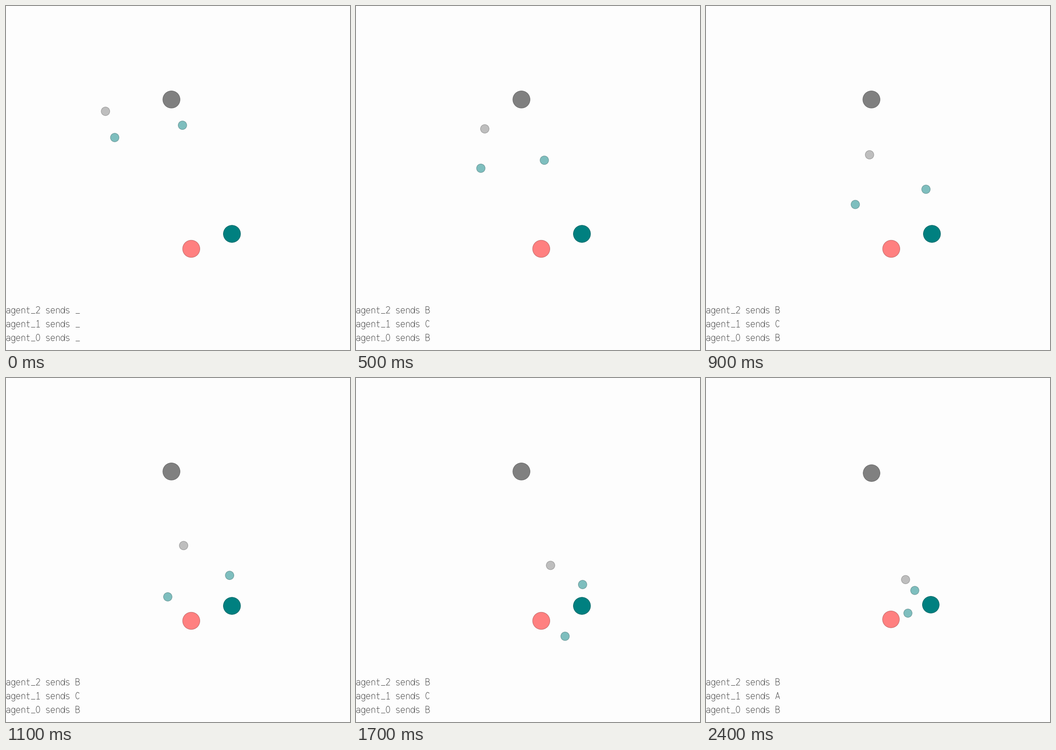
These frames come from a looping animation (748x748 px, 2500 ms). A matplotlib script:

```python
import numpy as np
import matplotlib.pyplot as plt
from matplotlib.animation import FuncAnimation
from matplotlib.collections import LineCollection
from matplotlib.patches import Circle

SIZE, DPI = 748, 100
FRAMES, INTERVAL = 25, 100
CENTER = SIZE / 2
PX = 72 / DPI

# World: each step adds one push along an axis and damps the velocity.
PUSH, KEEP = 9.39, 0.75
VIEW_LIMIT = 189.8
MOVES = {"L": (-1, 0), "R": (1, 0), "U": (0, -1), "D": (0, 1), ".": (0, 0)}

TEAL, GREY, RED = (0, 0.5, 0.5), (0.5, 0.5, 0.5), (1, 0.5, 0.5)
AGENTS = [
    ((236.4, 286.0), "DRDDRDDRRDDRRDRLRLUULRLU", TEAL),
    ((383.7, 259.3), "DDDRRRDDRLDRLURLLRLRLLDR", TEAL),
    ((216.3, 229.0), "RRDDRRDRDDRRLLRLRUD.LRDD", GREY),
]
LANDMARKS = [((359.7, 203.3), GREY), ((402.8, 528.0), RED), ((491.3, 495.5), TEAL)]

ADVANCE = 10.75
ROWS = [("agent_2", 668), ("agent_1", 698), ("agent_0", 728)]


def walk(start, moves):
    pos, vel = np.array(start), np.zeros(2)
    path = [pos]
    for m in moves:
        vel = KEEP * vel + PUSH * np.array(MOVES[m])
        pos = pos + vel
        path.append(pos)
    return np.array(path)


def arc(cx, cy, rx, ry, a0=0, a1=360):
    t = np.radians(np.linspace(a0, a1, 28))
    return list(zip(cx + rx * np.cos(t), cy - ry * np.sin(t)))


# Single-line glyphs; the baseline is y = 0 and y points down.
GLYPHS = {
    " ": [],
    "_": [[(0.6, -0.5), (9.6, -0.5)]],
    "a": [arc(5, -7.4, 3.5, 3, 160, 0) + [(8.5, 0)], arc(4.8, -3, 3.7, 3)],
    "d": [arc(4.8, -5.2, 3.8, 5.2), [(8.6, -14.6), (8.6, 0)]],
    "e": [[(1.2, -5.4)] + arc(5, -5.2, 3.9, 5.2, 0, 320)],
    "g": [arc(4.8, -5.2, 3.8, 5.2), [(8.6, -10.4)] + arc(5, 1.5, 3.6, 3.2, 0, -160)],
    "n": [[(1.6, -10.4), (1.6, 0)], arc(5.2, -6.8, 3.6, 3.6, 180, 0) + [(8.8, 0)]],
    "s": [arc(5, -7.8, 3.3, 2.6, 25, 270) + arc(5, -2.6, 3.5, 2.6, 90, -155)],
    "t": [[(4.2, -14)] + arc(6.4, -2.4, 2.2, 2.4, 180, 310), [(1.4, -10.4), (8, -10.4)]],
    "0": [arc(5, -7.3, 3.9, 7.3)],
    "1": [[(2.4, -12.2), (5.4, -14.6), (5.4, 0)], [(2, 0), (8.8, 0)]],
    "2": [arc(5, -10.8, 3.8, 3.8, 165, -30) + [(1.2, 0), (9.2, 0)]],
    "A": [[(0.8, 0), (5.2, -14.6), (9.6, 0)], [(2.3, -5), (8.1, -5)]],
    "B": [[(1.4, 0), (1.4, -14.6)] + arc(5.4, -11.2, 3.2, 3.4, 90, -90) + [(1.4, -7.8)],
          [(5.4, -7.8)] + arc(5.4, -3.9, 4, 3.9, 90, -90) + [(1.4, 0)]],
    "C": [arc(5.4, -7.3, 4.2, 7.3, 40, 320)],
}


def strokes(text, baseline):
    return [np.array(line) + (i * ADVANCE, baseline)
            for i, ch in enumerate(text) for line in GLYPHS[ch]]


def messages(frame):
    if frame == 0:
        return "___"
    return "BCB" if frame < 18 else "BAB"


paths = [walk(start, moves) for start, moves, _ in AGENTS]

# The view zooms out when an agent strays too far, and stays there.
reach = np.max([np.abs(p - CENTER).max(axis=1) for p in paths], axis=0)
zoom = np.minimum(1, VIEW_LIMIT / np.maximum.accumulate(reach))

fig = plt.figure(figsize=(SIZE / DPI, SIZE / DPI), dpi=DPI, facecolor="#fdfdfd")
ax = fig.add_axes([0, 0, 1, 1])
ax.set(xlim=(0, SIZE), ylim=(SIZE, 0))
ax.axis("off")


def disc(color, alpha, z):
    fill = 1 - alpha * (1 - np.array(color))
    patch = Circle((0, 0), 1, fc=(*color, alpha), ec=(*(fill * 0.72), 0.85),
                   lw=PX, zorder=z)
    return ax.add_patch(patch)


agents = [disc(c, 0.5, 2) for _, _, c in AGENTS]
marks = [disc(c, 1, 3) for _, c in LANDMARKS]
label = ax.add_collection(LineCollection([], colors="#4c4c4c", linewidths=PX, zorder=4))


def place(patch, pos, radius, k):
    patch.center = tuple(CENTER + k * (np.array(pos) - CENTER))
    patch.radius = radius * k


def draw(frame):
    k = zoom[frame]
    for patch, path in zip(agents, paths):
        place(patch, path[frame], 9.3, k)
    for patch, (pos, _) in zip(marks, LANDMARKS):
        place(patch, pos, 18.7, k)
    lines = []
    for (name, y), msg in zip(ROWS, messages(frame)):
        lines += strokes(f"{name} sends {msg}", y)
    label.set_segments(lines)
    return [*agents, *marks, label]


anim = FuncAnimation(fig, draw, frames=FRAMES, interval=INTERVAL, repeat=True,
                     repeat_delay=0, blit=False)
plt.show()
```
